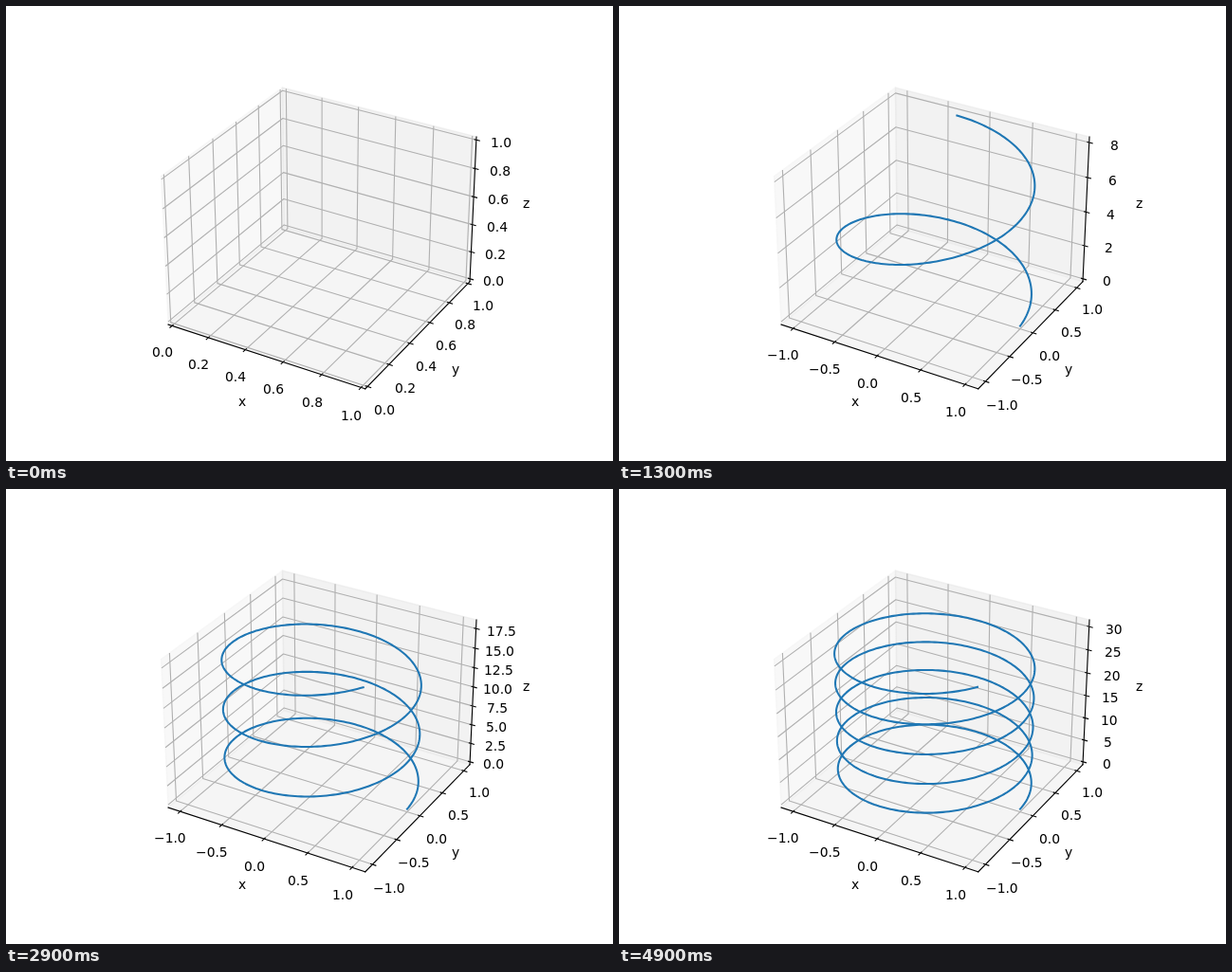
Recreate the animation shown at these times as an HTML page with a canvas. Size 640x480 px, loop 5 s.

```html
<!DOCTYPE html>
<html lang="en">
<head>
<meta charset="utf-8">
<title>Growing helix</title>
<style>
  html, body { margin: 0; width: 100%; height: 100%; overflow: hidden; background: #fff; }
  canvas { display: block; width: 640px; height: 480px; }
</style>
</head>
<body>
<canvas id="stage" width="640" height="480"></canvas>
<script>
const ctx = document.getElementById('stage').getContext('2d');

const STEP_MS = 100, STEPS = 50, PER_STEP = 20;
const DTHETA = 10 * Math.PI / (STEPS * PER_STEP - 1);
const PT = 100 / 72;

// Camera: azimuth -60 deg, elevation 30 deg, distance 10
const S3 = Math.sqrt(3);
const RIGHT = [S3 / 2, 0.5, 0];
const UP = [-0.25, S3 / 4, S3 / 2];
const TOWARD = [S3 / 4, -0.75, 0.5];
const DIST = 10, ZOOM = 369.6 / 0.185, CX = 332.99, CY = 237.41;

const BOX = [8 / 7, 8 / 7, 6 / 7];   // world size of the data range
const PAD = 1 / 48;                  // pane overhang as a share of the range
const LO = -PAD, HI = 1 + PAD;
const PER_POINT = 48 / (2 * 3.696 * 72) / 12;
const TICK_GAP = 11.5 * PER_POINT, NAME_GAP = 25 * PER_POINT;

const FAR = [LO, HI, LO], NEAR = [HI, LO, HI];
const AXES = [
  { name: 'x', edge: [LO, LO, LO], tickDir: 1 },
  { name: 'y', edge: [HI, HI, LO], tickDir: 0 },
  { name: 'z', edge: [HI, HI, LO], tickDir: 0 }
];
const PANES = ['rgba(242,242,242,.5)', 'rgba(230,230,230,.5)', 'rgba(236,236,236,.5)'];

const dot = (a, b) => a[0] * b[0] + a[1] * b[1] + a[2] * b[2];
const put = (p, i, v) => p.map((c, j) => j === i ? v : c);

// Range fractions (0..1 on each axis) to pixels
function project(f) {
  const p = f.map((v, i) => (v - 0.5) * BOX[i]);
  const k = ZOOM / (DIST - dot(TOWARD, p));
  return [CX + dot(RIGHT, p) * k, CY - dot(UP, p) * k];
}

function trace(points) {
  ctx.beginPath();
  for (const p of points) ctx.lineTo(...project(p));
}

function stroke(points, color, pt, cap = 'square') {
  trace(points);
  ctx.strokeStyle = color;
  ctx.lineWidth = pt * PT;
  ctx.lineCap = cap;
  ctx.lineJoin = 'round';
  ctx.stroke();
}

// Shift outward on every axis except the given one
const outward = (p, skip, gap) =>
  p.map((v, i) => i === skip ? v : v + (v < 0.5 ? -gap : gap));

function label(text, p, drop) {
  const [x, y] = project(p);
  const left = Math.round(x - ctx.measureText(text).width / 2);
  ctx.fillText(text, left, Math.round(y + drop));
}

function ticksFor([min, max]) {
  const raw = (max - min) / 8;
  const mag = 10 ** Math.floor(Math.log10(raw));
  const step = [1, 2, 2.5, 5, 10].map(s => s * mag).find(s => s >= raw - 1e-9);
  let digits = 0;
  while (Math.abs(step * 10 ** digits - Math.round(step * 10 ** digits)) > 1e-6) digits++;
  const ticks = [];
  for (let k = Math.floor(min / step); k <= Math.ceil(max / step); k++) {
    const at = (k * step - min) / (max - min);
    if (at >= LO - 1e-9 && at <= HI + 1e-9)
      ticks.push({ at, text: (k * step).toFixed(digits).replace('-', '\u2212') });
  }
  return ticks;
}

function helix(count) {
  return Array.from({ length: count }, (_, i) => {
    const a = i * DTHETA;
    return [Math.cos(a), Math.sin(a), a];
  });
}

function limits(points, axis) {
  if (!points.length) return [0, 1];
  const vals = points.map(p => p[axis]);
  const min = Math.min(...vals), max = Math.max(...vals);
  const margin = axis < 2 ? 0.05 * (max - min) : 0;
  return [min - margin, max + margin];
}

function drawPane(i) {
  const j = (i + 1) % 3, k = (i + 2) % 3;
  const a = FAR, b = put(a, j, NEAR[j]), c = put(b, k, NEAR[k]), d = put(a, k, NEAR[k]);
  trace([a, b, c, d]);
  ctx.closePath();
  ctx.fillStyle = ctx.strokeStyle = PANES[i];
  ctx.lineWidth = PT;
  ctx.lineJoin = 'miter';
  ctx.fill();
  ctx.stroke();
}

function drawAxis(i, range) {
  const { name, edge, tickDir } = AXES[i];
  const ticks = ticksFor(range);
  const j = (i + 1) % 3, k = (i + 2) % 3;

  stroke([put(edge, i, LO), put(edge, i, HI)], '#000', 0.8);
  for (const { at } of ticks) {
    const corner = put(FAR, i, at);
    stroke([put(corner, j, NEAR[j]), corner, put(corner, k, NEAR[k])], '#b0b0b0', 0.8, 'butt');
  }

  ctx.fillStyle = '#000';
  label(name, outward(put(edge, i, 0.5), i, NAME_GAP), 4);

  const side = edge[tickDir] < 0.5 ? -1 : 1;
  for (const { at, text } of ticks) {
    const p = put(edge, i, at), e = edge[tickDir];
    stroke([put(p, tickDir, e - side * 0.1 / 12), put(p, tickDir, e + side * 0.2 / 12)], '#000', 0.8);
    label(text, outward(p, i, TICK_GAP), 11);
  }
}

function draw(step) {
  const points = helix(step * PER_STEP);
  const ranges = AXES.map((_, i) => limits(points, i));
  ctx.fillStyle = '#fff';
  ctx.fillRect(0, 0, 640, 480);
  ctx.font = `${10 * PT}px "DejaVu Sans", sans-serif`;
  AXES.forEach((_, i) => drawPane(i));
  AXES.forEach((_, i) => drawAxis(i, ranges[i]));
  if (points.length) {
    const fractions = points.map(p =>
      p.map((v, i) => (v - ranges[i][0]) / (ranges[i][1] - ranges[i][0])));
    stroke(fractions, '#1f77b4', 1.5);
  }
}

let shown = -1;
function tick() {
  const step = Math.floor(performance.now() / STEP_MS) % STEPS;
  if (step !== shown) draw(shown = step);
  requestAnimationFrame(tick);
}
tick();
</script>
</body>
</html>
```
